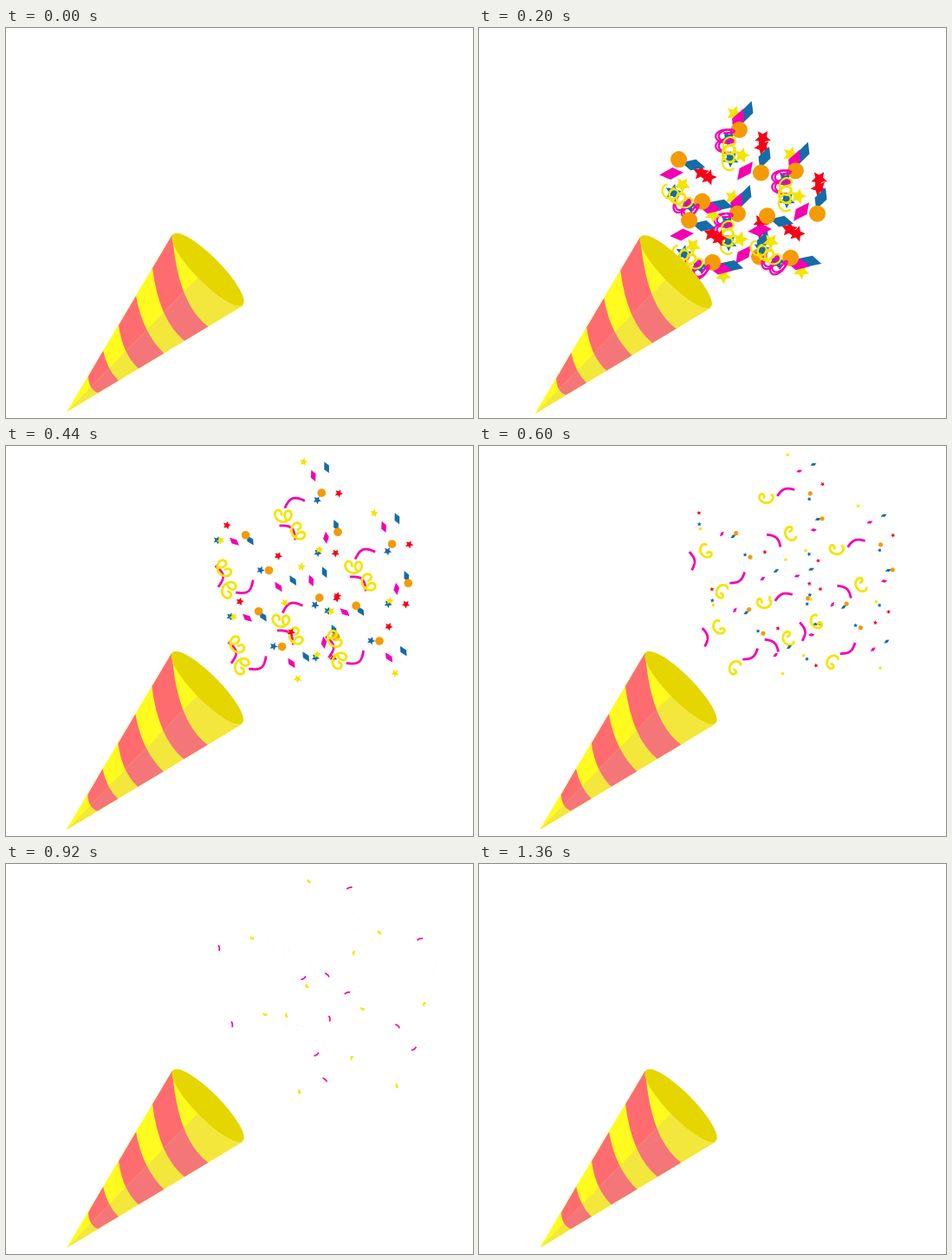
Write an HTML page with a canvas that moves like this. It is 539 by 450 pixels and loops after 9.36 s.

```html
<!DOCTYPE html>
<html lang="en">
<head>
<meta charset="utf-8">
<title>Party popper</title>
<style>
  html, body { margin: 0; width: 100%; height: 100%; overflow: hidden; background: #fff; }
  canvas { display: block; width: 539px; height: 450px; }
</style>
</head>
<body>
<canvas id="stage"></canvas>
<script>
const W = 539, H = 450, LOOP = 9360, STEP = 40, END = 1360;
const OPEN = 280, FADE = 760; // cluster fully open, confetti almost gone
const canvas = document.getElementById('stage');
const ctx = canvas.getContext('2d');
const dpr = window.devicePixelRatio || 1;
canvas.width = W * dpr;
canvas.height = H * dpr;

const YELLOW = '#f3e500', BLUE = '#146ca8', PINK = '#f400b1', ORANGE = '#f49b04', RED = '#f70018';

const rad = deg => deg * Math.PI / 180;
const clamp = x => Math.max(0, Math.min(1, x));
const mix = (a, b, u) => a + (b - a) * u;

// ---- Confetti
function polygon(points) {
  const p = new Path2D();
  points.forEach(([x, y]) => p.lineTo(x, y));
  p.closePath();
  return p;
}
const circle = new Path2D();
circle.arc(0, 0, 1, 0, 2 * Math.PI);

const disc = { path: circle, size: 8.7 };
const card = { path: polygon([[-1, 0], [-0.13, -0.49], [1, 0], [0.13, 0.49]]), size: 12.7 };
const star = {
  path: polygon(Array.from({ length: 10 }, (_, i) => {
    const r = i % 2 ? 0.48 : 1, a = rad(i * 36 - 90);
    return [r * Math.cos(a), r * Math.sin(a)];
  })),
  size: 8.8
};

const piece = (shape, color, turn, from, to, bow) => ({ shape, color, turn, from, to, bow });
const pieces = [
  piece(star, RED, 8, [366, 70], [406, 36], 0),
  piece(star, RED, 20, [364, 108], [400, 138], 2),
  piece(card, BLUE, -23, [347, 34], [398, 20], -3),
  piece(card, BLUE, -22, [366, 102], [399, 79], 0),
  piece(star, BLUE, 12, [327, 71], [398, 63], -5),
  piece(star, BLUE, 12, [329, 118], [397, 125], 2),
  piece(star, YELLOW, -8, [325, 33], [366, 5], -2),
  piece(star, YELLOW, -12, [339, 114], [389, 120], 3),
  piece(card, PINK, -20, [333, 45], [381, 26], -2),
  piece(card, PINK, -5, [345, 119], [399, 90], 0),
  piece(disc, ORANGE, 0, [338, 60], [396, 58], -5),
  piece(disc, ORANGE, 0, [364, 119], [406, 71], 2)
];

// Pieces slow down as if by air drag, so progress is logarithmic in time.
function drawPiece({ shape, color, turn, from, to, bow }, t) {
  const u = Math.log(t / OPEN) / Math.log(FADE / OPEN);
  const size = shape.size * Math.max(0, 1 - 0.78 * u) ** 1.35;
  if (size <= 0) return;
  ctx.save();
  ctx.translate(mix(from[0], to[0], u), mix(from[1], to[1], u) + 4 * bow * u * (1 - u));
  ctx.rotate(rad(turn + (t - OPEN) * 360 / 640));
  ctx.scale(size, size);
  ctx.fillStyle = color;
  ctx.fill(shape.path);
  ctx.restore();
}

// ---- Streamers: coils that unwind while drifting at a steady speed
const ribbon = (v, coil) => ({ turns: 0.5 + 1.6 * coil, len: 28 - 10 * v, r: 10 - 8 * v, loop: 0.5 * coil });
const curl = v => ({ turns: 2 - 1.1 * v, len: 24 - 16 * v, r: 8 - 4.5 * v, loop: 1 });

const streamers = [
  { color: PINK, form: ribbon, angle: -20, from: [311, 77], to: [375, 40] },
  { color: PINK, form: ribbon, angle: 42, from: [312, 88], to: [356, 118] },
  { color: YELLOW, form: curl, angle: 4, from: [311, 98], to: [340, 39] },
  { color: YELLOW, form: curl, angle: 65, from: [318, 97], to: [381, 101] }
];

function drawStreamer({ color, form, angle, from, to }, t) {
  const v = (t - OPEN) / (FADE - OPEN);
  const coil = clamp(1 - 3 * v);
  const fade = Math.min(1, Math.exp(3 - 3 * v));
  const { turns, len, r, loop } = form(Math.min(1, v), coil);
  ctx.save();
  ctx.translate(mix(from[0], to[0], v), mix(from[1], to[1], v));
  ctx.rotate(rad(mix(angle, 90, coil)));
  ctx.scale(fade, fade);
  ctx.beginPath();
  for (let w = 0; w <= 1; w += 1 / 64) {
    const a = 2 * Math.PI * turns * w;
    ctx.lineTo(len * (w - 0.5) + loop * r * Math.cos(a), r * (0.4 - Math.sin(a)));
  }
  ctx.strokeStyle = color;
  ctx.lineWidth = 2.8 / Math.sqrt(fade);
  ctx.stroke();
  ctx.restore();
}

// ---- Burst: one cluster, placed three times plain and three times mirrored
const plain = (x, y) => [1, 0, 0, 1, x, y];
const mirrored = (x, y) => {
  const c = Math.cos(rad(-56)), s = Math.sin(rad(-56));
  return [c, s, s, -c, 144.7 + x, 475.8 + y];
};
const copies = [
  plain(0, 0), plain(81.3, 59), plain(-2.5, 121),
  mirrored(0, 0), mirrored(15, 88), mirrored(127.5, 81.5)
];

function drawBurst(t) {
  const grow = Math.min(1, t / 250);
  const late = Math.max(120, t);
  ctx.save();
  ctx.translate(228, 309);
  ctx.scale(grow, grow);
  ctx.translate(-228, -309);
  for (const m of copies) {
    ctx.save();
    ctx.transform(...m);
    pieces.forEach(p => drawPiece(p, late));
    streamers.forEach(s => drawStreamer(s, late));
    ctx.restore();
  }
  ctx.restore();
}

// ---- Cone
const body = new Path2D('M70 443L191.5 239L273 320.5Z');
const shade = new Path2D('M70 443L232 277L290 310L270 330Z');
const stripes = new Path2D(
  'M192 238Q198 319 234 345L206 361Q176.5 337 169 277Z' +
  'M150 309Q157.5 352 183 376L153 393Q134.5 376 130 343Z' +
  'M112 372Q117 395 130 407L106 421Q95.5 417 95 402Z');
const mouth = new Path2D();
mouth.ellipse(233, 278.7, 57.3, 14.8, rad(45.3), 0, 2 * Math.PI);

function paintBody(base, stripe) {
  ctx.fillStyle = base;
  ctx.fill(body);
  ctx.save();
  ctx.clip(body);
  ctx.fillStyle = stripe;
  ctx.fill(stripes);
  ctx.restore();
}

function drawCone(t) {
  const kick = t < 120 ? t / 120 : t < 900 ? Math.exp((120 - t) / 110) : 0;
  ctx.save();
  ctx.translate(-12 * kick, 5.2 * kick);
  paintBody('#fffb1e', '#ff6c70');
  ctx.save();
  ctx.clip(shade);
  paintBody('#f3e73c', '#f47679');
  ctx.restore();
  ctx.fillStyle = '#e5d600';
  ctx.fill(mouth);
  ctx.restore();
}

function frame(now) {
  const t = Math.floor((now % LOOP) / STEP) * STEP;
  ctx.setTransform(dpr, 0, 0, dpr, 0, 0);
  ctx.fillStyle = '#fff';
  ctx.fillRect(0, 0, W, H);
  if (t > 0 && t < END) drawBurst(t);
  drawCone(t);
}

const start = performance.now();
(function loop() {
  frame(performance.now() - start);
  requestAnimationFrame(loop);
})();
</script>
</body>
</html>
```
